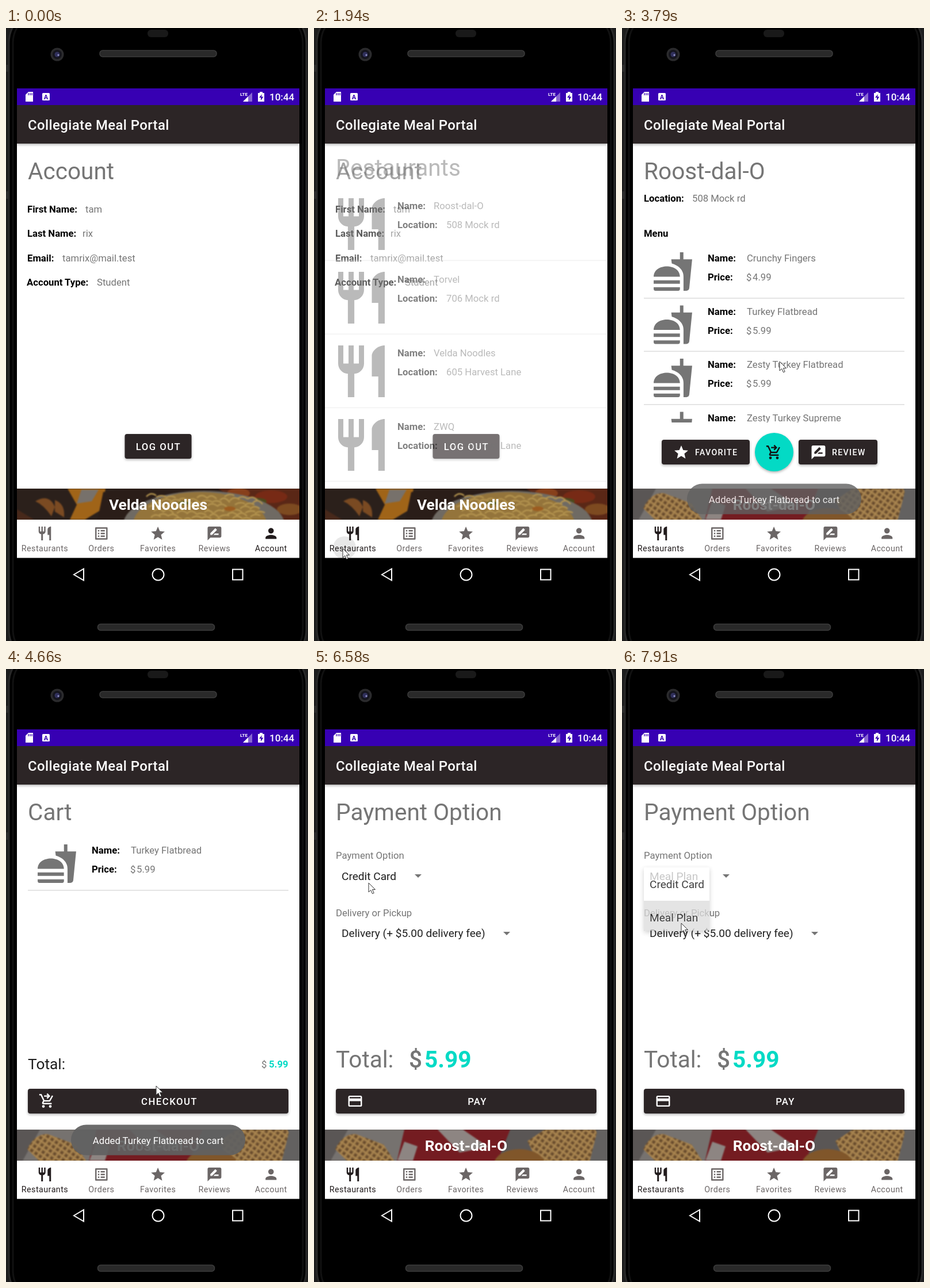
An HTML page that plays this animation: 525 by 1066 pixels, repeating every 7.99 s.

```html
<!DOCTYPE html>
<html lang="en">
<head>
<meta charset="utf-8">
<title>Campus meal ordering</title>
<style>
  html, body { margin: 0; width: 100%; height: 100%; overflow: hidden; background: #000; }
  svg { display: block; }
  text { font-family: Roboto, sans-serif; white-space: pre; }
  .raised { filter: drop-shadow(0 2px 2px rgba(0, 0, 0, .3)); }
  .popup { filter: drop-shadow(0 3px 4px rgba(0, 0, 0, .25)); }
  .photo { filter: blur(1px); }
</style>
</head>
<body>
<script>
const LOOP = 7990;
const GREY = '#757575', DARK = '#2c2526', TEAL = '#03dac5', INK = '#1f1f1f';
const BODY = 16.7, HEAD = 40.6;

const ICONS = {
  fork: 'M11 9H9V2H7v7H5V2H3v7c0 2.12 1.66 3.84 3.75 3.97V22h2.5v-9.03C11.34 12.84 13 11.12 13 9V2h-2v7zm5-3v8h2.5v8H21V2c-2.76 0-5 2.24-5 4z',
  list: 'M19 5v14H5V5h14m1.1-2H3.9c-.5 0-.9.4-.9.9v16.2c0 .4.4.9.9.9h16.2c.4 0 .9-.5.9-.9V3.9c0-.5-.5-.9-.9-.9zM11 7h6v2h-6zm0 4h6v2h-6zm0 4h6v2h-6zM7 7h2v2H7zm0 4h2v2H7zm0 4h2v2H7z',
  star: 'M12 17.27L18.18 21l-1.64-7.03L22 9.24l-7.19-.61L12 2 9.19 8.63 2 9.24l5.46 4.73L5.82 21z',
  review: 'M20 2H4c-1.1 0-2 .9-2 2v18l4-4h14c1.1 0 2-.9 2-2V4c0-1.1-.9-2-2-2zM6 14v-2.47l6.88-6.88c.2-.2.51-.2.71 0l1.77 1.77c.2.2.2.51 0 .71L8.47 14H6zm12 0h-7.5l2-2H18v2z',
  person: 'M12 12c2.21 0 4-1.79 4-4s-1.79-4-4-4-4 1.79-4 4 1.79 4 4 4zm0 2c-2.67 0-8 1.34-8 4v2h16v-2c0-2.66-5.33-4-8-4z',
  food: 'M18.06 23h1.66c.84 0 1.53-.64 1.63-1.46L23 5.05h-5V1h-1.97v4.05h-4.97l.3 2.34c1.71.47 3.31 1.32 4.27 2.26 1.44 1.42 2.43 2.89 2.43 5.29zM1 22v-1h15.03v1c0 .55-.45 1-1.01 1H2c-.56 0-1-.45-1-1zm15.03-7C16.03 7 1 7 1 15zM1 17h15v2H1z',
  cart: 'M7 18a2 2 0 1 0 0 4 2 2 0 0 0 0-4zm10 0a2 2 0 1 0 0 4 2 2 0 0 0 0-4zm-9.83-3.25l.03-.12.9-1.63h7.45c.75 0 1.41-.41 1.75-1.03l3.86-7.01L19.42 4l-3.87 7H8.53L4.27 2H1v2h2l3.6 7.59-1.35 2.45C4.5 15.4 5.5 17 7 17h12v-2H7.42c-.13 0-.25-.11-.25-.25zM8 4h5.2l-1.6-1.6L13 1l4 4-4 4-1.4-1.4L13.2 6H8z',
  card: 'M20 4H4c-1.1 0-2 .9-2 2v12c0 1.1.9 2 2 2h16c1.1 0 2-.9 2-2V6c0-1.1-.9-2-2-2zm0 14H4v-6h16v6zm0-10H4V6h16v2z'
};

// Markup helpers
const text = (x, y, str, size = BODY, fill = GREY, attrs = '') =>
  `<text x="${x}" y="${y}" font-size="${size}" fill="${fill}" ${attrs}>${str}</text>`;
const bold = (x, y, str, size = BODY, fill = '#000') => text(x, y, str, size, fill, 'font-weight="700"');
const caps = (x, y, str, size = BODY, anchor = 'start') =>
  text(x, y, str, size, '#fff', `font-weight="500" letter-spacing=".089em" text-anchor="${anchor}"`);
const rect = (x, y, w, h, fill, attrs = '') =>
  `<rect x="${x}" y="${y}" width="${w}" height="${h}" fill="${fill}" ${attrs}/>`;
const path = (d, fill, attrs = '') => `<path d="${d}" fill="${fill}" ${attrs}/>`;
const oval = (cx, cy, rx, ry, fill, attrs = '') =>
  `<ellipse cx="${cx}" cy="${cy}" rx="${rx}" ry="${ry}" fill="${fill}" ${attrs}/>`;
const icon = (name, cx, cy, fill = '#fff', scale = 1.195) =>
  path(ICONS[name], fill, `transform="translate(${cx} ${cy}) scale(${scale}) translate(-12 -12)"`);
const button = (x, y, w) => rect(x, y, w, 43, DARK, 'rx="4" class="raised"');
const layer = (id, content) => `<g id="${id}">${content}</g>`;
const field = (x, y, label, valueX, value) => bold(x, y, label) + text(valueX, y, value);
const heading = (str, y = 263) => text(38, y, str, HEAD);
const line = (x1, x2, y, fill) => rect(x1, y, x2 - x1, 1.6, fill);
const arrow = (x, y) => path(`M${x} ${y}h12l-6 6z`, GREY);

const dish = (y, name, price) =>
  icon('food', 88.5, y + 17.5, GREY, 3.04) +
  field(149, y, 'Name:', 217, name) +
  field(149, y + 33, 'Price:', 216, '$') + text(227, y + 33, price) +
  line(38, 491, y + 63, '#dedede');

const place = ([name, address], i) => {
  const y = 315 + i * 128;
  return icon('fork', 82.5, y + 26, GREY, 4.5) +
    field(145, y, 'Name:', 208, name) + field(145, y + 32.5, 'Location:', 230, address) +
    line(19, 508, y + 88.5, '#e6e6e6');
};

const account = heading('Account') +
  field(37, 321, 'First Name:', 138, 'tam') +
  field(37, 363, 'Last Name:', 133, 'rix') +
  field(37, 406, 'Email:', 98, 'tamrix@mail.test') +
  field(36, 448, 'Account Type:', 158, 'Student') +
  button(206.5, 706, 116) + caps(265, 734, 'LOG OUT', BODY, 'middle');

const restaurants = heading('Restaurants', 257) + [
  ['Roost-dal-O', '508 Mock rd'], ['Torvel', '706 Mock rd'],
  ['Velda Noodles', '605 Harvest Lane'], ['ZWQ', '777 Harvest Lane']
].map(place).join('');

const detail = heading('Roost-dal-O') +
  field(38, 302, 'Location:', 122, '508 Mock rd') + bold(38, 363, 'Menu') +
  '<svg width="525" height="686">' + [
    ['Crunchy Fingers', '4.99'], ['Turkey Flatbread', '5.99'],
    ['Zesty Turkey Flatbread', '5.99'], ['Zesty Turkey Supreme', '6.49']
  ].map(([name, price], i) => dish(406 + i * 92.5, name, price)).join('') + '</svg>' +
  button(69, 716, 153) + icon('star', 103, 738) + caps(127, 743, 'FAVORITE', 14.3) +
  button(307, 716, 137) + icon('review', 341.5, 738) + caps(365, 743, 'REVIEW', 14.3) +
  oval(264.5, 737.5, 33.5, 33.5, TEAL, 'class="raised"') + icon('cart', 264, 738, '#111');

const cart = heading('Cart') + dish(321, 'Turkey Flatbread', '5.99') +
  text(38, 696, 'Total:', 26.3, INK) + text(444, 693, '$') + bold(457, 693, '5.99', BODY, TEAL) +
  button(38, 730, 453) + icon('cart', 71, 751) + caps(284, 758, 'CHECKOUT', BODY, 'middle');

const payment = heading('Payment Option') +
  text(38, 330, 'Payment Option') +
  text(48, 367, 'Credit Card', 19.1, INK, 'id="choice"') + arrow(175, 357) +
  text(38, 430, 'Delivery or Pickup') +
  text(48, 466, 'Delivery (+ $5.00 delivery fee)', 19.1, INK) + arrow(329, 457) +
  text(38, 693, 'Total:', HEAD) + text(165, 693, '$', HEAD, GREY, 'font-weight="500"') +
  bold(192, 693, '5.99', HEAD, TEAL) +
  button(38, 730, 453) + icon('card', 71.5, 751.5) + caps(284, 758, 'PAY', BODY, 'middle');

const popup = rect(38, 345, 114, 110, '#fff', 'rx="2" class="popup"') +
  rect(38, 403, 114, 52, '#000', 'id="pressed"') +
  text(48, 381, 'Credit Card', 19.1, '#000') + text(48, 439, 'Meal Plan', 19.1, '#000');

const banner = (id, name, art) => layer(id,
  `<svg x="19" y="801" width="491" height="54"><g class="photo">${art}</g></svg>` +
  text(264.5, 838, name, 26.3, '#fff', 'font-weight="700" text-anchor="middle"'));

let noodles = '';
for (let i = 0; i < 60; i++) {
  const x = 225 + (i * 53) % 190, y = 14 + (i * 29) % 42;
  noodles += `M${x} ${y}q8 ${-9 + i % 5} 17 ${i % 7 - 2}`;
}
const noodleArt = rect(-9, -9, 510, 72, '#2b201b') +
  path('M32 22q24-14 34 10l-6 16q-14-20-28-26zM66 20q18 6 16 30l-16-10z', '#7a4a22') +
  path('M0 36l30 18H0z', '#47281a') +
  path('M88 0h66l-6 36-30 18H92l12-26z', '#a06418') + path('M112 2h30l-12 20-26 4z', '#77716b') +
  path('M150 6l50-6h180v54H140z', '#2a1d18') + path('M350 0h150v60h-60z', '#5a2716') +
  oval(385, 8, 20, 9, '#87401b') + oval(442, 14, 28, 11, '#772a15') +
  oval(474, 36, 22, 10, '#7d4a20') + oval(417, 22, 17, 6, '#4c4a1d') +
  oval(325, 62, 140, 58, '#6f6a63') + oval(318, 62, 116, 56, '#94743b') +
  path(noodles, 'none', 'stroke="#b4944f" stroke-width="2.5"') +
  oval(290, 25, 9, 3, '#5c6428') + oval(370, 35, 10, 4, '#9c5c20');

const fries = d => path(d, '#86663c') + path(d, 'url(#waffle)');
const friesArt = rect(-9, -9, 510, 72, '#5a5655') +
  path('M10 54L40 0h100l40 60z', '#76726f') +
  path('M138 0h184l-24 60H124z', '#741c21') +
  path('M196 0h44l44 30-50 10z', '#8d8582') + path('M126 54l12-33 23 8-8 25z', '#8d8582') +
  fries('M18 34Q32 6 54 8l48 18 22 34H44z') + fries('M352 20L382 0h88l12 25-25 35H372z') +
  oval(338, 60, 44, 26, '#80562a') + path('M474 0h27v60h-42z', '#636160');

const tabs = [['fork', 'Restaurants'], ['list', 'Orders'], ['star', 'Favorites'], ['review', 'Reviews'], ['person', 'Account']];
const navBar = rect(19, 855, 491, 66.5, '#fff') + tabs.map(([name, label], i) => {
  const x = 67.5 + i * 98.3;
  return `<g class="tab">${icon(name, x, 879, 'currentColor')}` +
    text(x, 910, label, 14.3, 'currentColor', 'letter-spacing=".45" text-anchor="middle"') + '</g>';
}).join('') + oval(53, 904, 20, 20, '#000', 'id="ripple"');

const speaker = (x, y) => rect(x, y, 203, 11, '#292929', 'rx="5" stroke="#3c3c3c" stroke-width="1.5"');
const phone = rect(0, 0, 525, 1066, '#1d1d1d') +
  rect(5, -32, 517, 1136, '#000', 'rx="58" stroke="#292929" stroke-width="3"') +
  rect(12, -26, 504, 1124, 'none', 'rx="52" stroke="#111" stroke-width="3"') +
  rect(0, 64, 4, 12, '#2c2c2c') + rect(0, 284, 4, 13, '#2c2c2c') +
  rect(246, 3, 36, 13, '#191919', 'rx="6"') + speaker(163, 39) + speaker(159.5, 1036.5) +
  oval(89, 46, 11.5, 11.5, '#2b2b2d') + oval(89, 46, 8, 8, '#15151d') +
  oval(89, 46, 4.5, 4.5, '#30305c') + oval(91, 47, 1.6, 1.6, '#9898c8') +
  `<g fill="none" stroke="#fff" stroke-width="2"><path d="M118 950.5l17-10v20z"/>
   <circle cx="264.5" cy="950.5" r="10"/><path d="M394 941.5h17.5v18H394z"/></g>`;

const topBars = rect(19, 134, 491, 67, DARK, 'class="raised"') + rect(19, 105, 491, 29, '#3700b3') +
  path('M39 111h8v17H34v-12z', '#fff') + path('M39 113v4m3-4v4m3-4v4', 'none', 'stroke="#3700b3" stroke-width="1.3"') +
  rect(63, 113, 13, 13, '#fff', 'rx="1.5"') + bold(65.8, 123.5, 'A', 11, '#3700b3') +
  bold(407, 118, 'LTE', 8, '#fff') +
  path('M428 112v16h-16z', '#fff', 'opacity=".4"') + path('M421 119v9h-9z', '#fff') +
  path('M441 111h5v2h3v15h-11v-15h3z', '#fff') + path('M445 115l-5 6h3v5l4.5-6.5H444z', '#3700b3') +
  text(458, 126, '10:44', 17, '#fff', 'font-weight="500"') +
  text(38, 176.5, 'Collegiate Meal Portal', 23.9, '#fff', 'font-weight="500" letter-spacing=".4"');

const toast = rect(113, 792.5, 303, 53, '#616161', 'rx="26.5" opacity=".93"') +
  text(264.5, 826, 'Added Turkey Flatbread to cart', BODY, '#fff', 'text-anchor="middle"');

const pages = { account, restaurants, detail, cart, payment };
document.body.innerHTML = `<svg width="100%" height="100%" viewBox="0 0 525 1066">
  <defs><pattern id="waffle" width="9" height="9" patternUnits="userSpaceOnUse" patternTransform="rotate(35)">
    <path d="M0 1h9M1 0v9" stroke="#a98550" stroke-width="3"/><path d="M4 4h4v4H4z" fill="#65482b"/></pattern></defs>
  ${phone}${rect(19, 134, 491, 787, '#fff')}
  ${Object.entries(pages).map(([id, content]) => layer(id, content)).join('')}
  ${layer('popup', popup)}${topBars}
  ${banner('noodleAd', 'Velda Noodles', noodleArt)}${banner('friesAd', 'Roost-dal-O', friesArt)}
  ${navBar}${layer('toast', toast)}
  <path id="cursor" d="M0 0v16l3.8-3.5 2.7 6.3 2.7-1.2-2.7-6h5z" fill="#fff" stroke="#333"/>
</svg>`;

const el = id => document.getElementById(id);
const show = (id, opacity) => el(id).setAttribute('opacity', opacity);
const ramp = (t, from, to) => Math.min(1, Math.max(0, (t - from) / (to - from)));

// Bursts of screen updates: start, end, number of steps
const BURSTS = [
  [1310, 2030, 10], [2110, 2630, 8], [2940, 3410, 7], [3570, 4350, 11], [4430, 4660, 4],
  [4960, 5200, 4], [5360, 5980, 9], [6130, 6740, 9], [6990, 7750, 11], [7830, 7910, 2]
];
const CURSOR = [
  [1230, 70, 975], [1710, 50, 905], [2030, 50, 905], [2420, 268, 352], [2870, 268, 352],
  [3410, 277, 495], [3500, 277, 496], [3804, 274, 580], [4270, 261, 725], [4880, 261, 725],
  [5200, 318, 371], [5290, 318, 371], [5670, 305, 756], [6050, 305, 756], [6587, 95, 372],
  [6740, 92, 358], [7150, 92, 358], [7520, 103, 442], [LOOP, 103, 442]
];

function snap(t) {
  const burst = BURSTS.findLast(b => t >= b[0]);
  if (!burst) return 0;
  const [start, end, steps] = burst, gap = (end - start) / (steps - 1);
  return Math.min(end, start + Math.floor((t - start + 15) / gap) * gap);
}

function moveCursor(t) {
  const i = Math.max(1, CURSOR.findIndex(k => k[0] >= t));
  const [t0, x0, y0] = CURSOR[i - 1], [t1, x1, y1] = CURSOR[i], p = ramp(t, t0, t1);
  el('cursor').setAttribute('transform', `translate(${x0 + (x1 - x0) * p} ${y0 + (y1 - y0) * p})`);
  show('cursor', t >= 1310 ? 1 : 0);
}

function draw(t) {
  const entered = [1, ramp(t, 1870, 2030), ramp(t, 2470, 2630), ramp(t, 4350, 4660), ramp(t, 5820, 5980), 0];
  Object.keys(pages).forEach((id, i) => show(id, entered[i] * (1 - entered[i + 1] ** 1.5)));

  const fresh = t >= 2470;
  show('noodleAd', fresh ? 0 : 1);
  show('friesAd', fresh ? 1 : 0);

  const selected = t < 1870 ? 4 : 0;
  document.querySelectorAll('.tab').forEach((tab, i) => {
    tab.style.color = i === selected ? '#211b1c' : '#6b6666';
  });
  show('ripple', t >= 1790 ? .09 * (1 - ramp(t, 1950, 2030)) : 0);

  show('toast', ramp(t, 3560, 3840) * (1 - ramp(t, 5290, 5520)));
  show('popup', ramp(t, 6910, 7140) * (1 - .25 * ramp(t, 7750, 7910)));
  show('pressed', .14 * ramp(t, 7500, 7700));
  el('choice').textContent = t < 7830 ? 'Credit Card' : 'Meal Plan';
  moveCursor(t);
}

function tick() {
  draw(snap(performance.now() % LOOP));
  requestAnimationFrame(tick);
}
tick();
</script>
</body>
</html>
```
